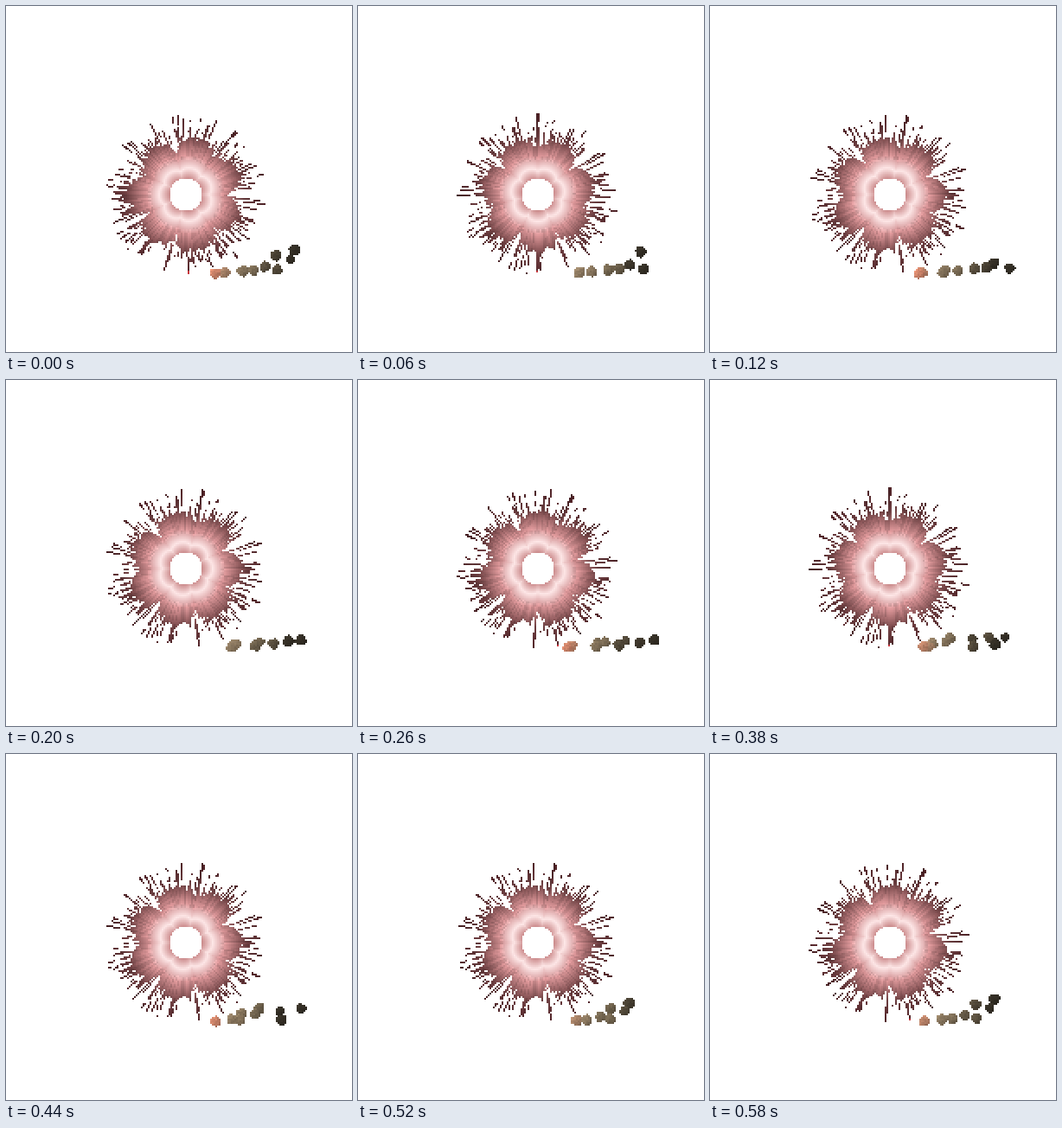
An HTML page with a canvas that plays this animation: 400 by 400 pixels, repeating every 600 ms.

```html
<!DOCTYPE html>
<html lang="en">
<head>
<meta charset="utf-8">
<title>Grinding wheel</title>
<style>
  html, body { margin: 0; width: 100%; height: 100%; overflow: hidden; background: #fff; }
  canvas { display: block; width: 400px; height: 400px; image-rendering: pixelated; }
</style>
</head>
<body>
<canvas id="stage" width="200" height="200"></canvas>
<script>
const ctx = document.getElementById('stage').getContext('2d');
const STEP = 20, COUNT = 30, SIZE = 200, PX = 2;
const CX = 208, CY = 218, TAU = Math.PI * 2;
const PETALS = 7, PHASES = 4, BINS = 280, HOLE = 19, REACH = 95;
const LIFE = 19;

const hash = n => {
  const s = Math.sin(n * 127.1 + 11.7) * 43758.5453;
  return s - Math.floor(s);
};
const rgb = (c, tone) => `rgb(${c.map(v => Math.round(Math.min(255, v * tone)))})`;

// Colour along a list of [position, r, g, b] stops
function ramp(stops, v) {
  let i = 1;
  while (i < stops.length - 1 && v > stops[i][0]) i++;
  const a = stops[i - 1], b = stops[i];
  const k = Math.min(1, Math.max(0, (v - a[0]) / (b[0] - a[0])));
  return [1, 2, 3].map(c => a[c] + (b[c] - a[c]) * k);
}

const WHEEL = [
  [19, 205, 142, 143], [31, 253, 230, 230], [46, 210, 144, 146],
  [70, 104, 60, 62], [92, 76, 34, 38]
];
const DEBRIS = [
  [0, 200, 128, 102], [0.15, 142, 122, 97], [0.5, 110, 97, 76], [0.85, 50, 45, 36]
];

// Calls plot(column, row, dx, dy) for every cell of the pixel grid around a point
function eachCell(cx, cy, reach, plot) {
  for (let j = Math.floor((cy - reach) / PX); j * PX < cy + reach; j++)
    for (let i = Math.floor((cx - reach) / PX); i * PX < cx + reach; i++)
      plot(i, j, i * PX + 1 - cx, j * PX + 1 - cy);
}

// Solid petals that thin out into broken radial bristles
function covered(r, bin, edge) {
  if (r < edge) return true;
  const density = Math.max(0.34, 0.66 - (r - edge) / 40);
  const tip = 74 + 21 * hash(bin + 400);
  const dash = hash(bin * 17 + Math.floor(r / 6));
  return r < tip && hash(bin) < density && dash < 0.8;
}

function drawWheel(phase) {
  const img = new OffscreenCanvas(SIZE, SIZE);
  const g = img.getContext('2d');
  const turn = phase * TAU / (PETALS * PHASES);
  eachCell(CX, CY, REACH, (i, j, dx, dy) => {
    const r = Math.hypot(dx, dy);
    const a = (Math.atan2(dy, dx) + turn + TAU) % TAU;
    const bin = Math.floor(a / TAU * BINS);
    const lobe = Math.sqrt(Math.abs(Math.sin(a * PETALS / 2)));
    const edge = 42 + 21 * lobe + 6 * hash(bin + 700);
    if (r < HOLE || !covered(r, bin, edge)) return;
    const red = dy > 87 && hash(bin + 50) > 0.5;
    const tone = r < 40 ? 1 : 0.9 + 0.2 * hash(bin + 900);
    g.fillStyle = red ? '#c8383e' : rgb(ramp(WHEEL, r + 5 * (1 - lobe)), tone);
    g.fillRect(i, j, 1, 1);
  });
  return img;
}

const wheels = Array.from({ length: PHASES }, (_, p) => drawWheel(p));

// Chips leave the rim one after another: [birth step, speed, rise per step]
const chips = [
  [0, 5.2, 0.6], [0, 4.6, 0.2], [5, 4.4, 0.7], [6, 6.2, 0.9], [6, 4.8, 0.1],
  [12, 5.1, 1.5], [13, 5.1, 0.95], [16, 5, 1.45], [17, 5.5, 0.3],
  [18, 4.8, 0.65], [22, 5.5, 0.45], [24, 5.3, 0.45], [28, 5.6, 0.35]
];

function drawChip([birth, speed, rise], id, f) {
  const age = (f - birth + COUNT) % COUNT;
  if (age > LIFE) return;
  const x = 242 + speed * age, y = 309 - rise * age;
  const size = 5 + 1.5 * hash(id + 3);
  const base = ramp(DEBRIS, age / LIFE);
  eachCell(x, y, 8, (i, j, dx, dy) => {
    const a = Math.atan2(dy, dx) + age * 0.5 + id;
    if (Math.hypot(dx, dy) > size * (1 + 0.08 * Math.sin(a * 3))) return;
    const grain = hash(i * 7 + j * 31 + f) - 0.5;
    ctx.fillStyle = rgb(base, 1 - 0.02 * (dx + dy) + 0.15 * grain);
    ctx.fillRect(i, j, 1, 1);
  });
}

function render(ms) {
  const f = Math.floor(ms / STEP) % COUNT;
  ctx.fillStyle = '#fff';
  ctx.fillRect(0, 0, SIZE, SIZE);
  ctx.drawImage(wheels[f % PHASES], 0, 0);
  chips.forEach((chip, id) => drawChip(chip, id, f));
}

const start = performance.now();
function tick() {
  render(performance.now() - start);
  requestAnimationFrame(tick);
}
tick();
</script>
</body>
</html>
```
